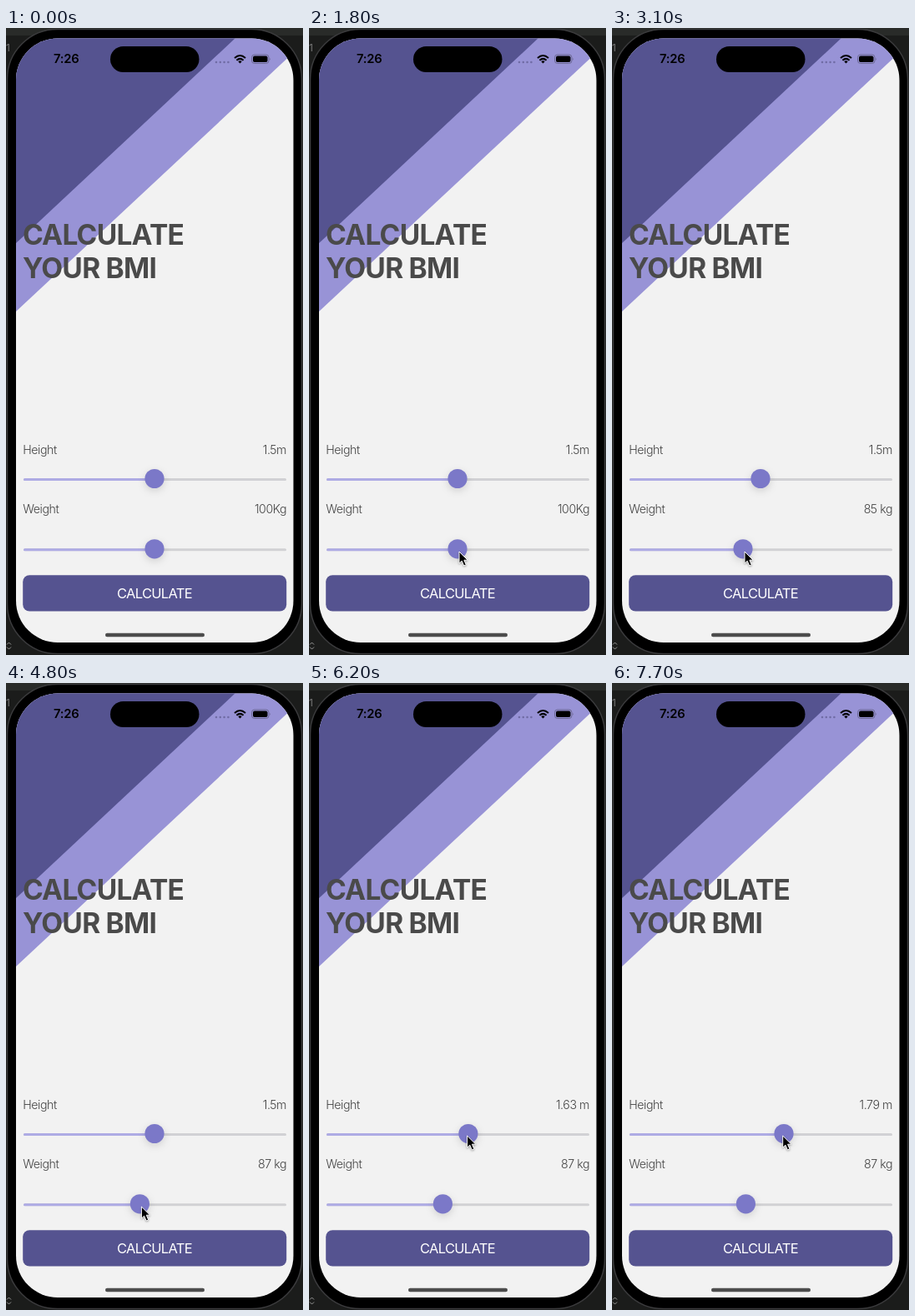
Write an HTML page that moves like this. It is 356x752 px and loops after 8 s.

```html
<!DOCTYPE html>
<html lang="en">
<head>
<meta charset="utf-8">
<title>BMI calculator</title>
<style>
  html, body { margin: 0; width: 100%; height: 100%; overflow: hidden; background: #1b1c1b; }
  svg { display: block; width: 100vw; height: 100vh; font-family: Inter, "Open Sans", sans-serif; }
  .title { font-size: 33.5px; font-weight: 700; letter-spacing: -.75px; fill: #4a4a4a; }
  .label { font-size: 14.2px; font-weight: 300; letter-spacing: -.45px; fill: #444; }
  .value { text-anchor: end; }
  .button { font-size: 16.5px; letter-spacing: -.7px; text-anchor: middle; fill: #fff; }
  .clock { font-size: 14.8px; font-weight: 600; letter-spacing: -.3px; text-anchor: middle; }
  .track { stroke: #d1d1d4; stroke-width: 3; stroke-linecap: round; }
  .fill { stroke: #aeabe4; }
  .knob { fill: #7b78c8; filter: drop-shadow(0 3px 5px #0002); }
</style>
</head>
<body>
<svg viewBox="0 0 356 752" preserveAspectRatio="none">
  <defs>
    <clipPath id="screen"><rect x="12" y="12.5" width="332.5" height="724.5" rx="50"/></clipPath>
  </defs>

  <!-- desktop and phone body -->
  <path d="M0 0H356V9H0Z" fill="#292b29"/>
  <text x="0" y="28" font-size="12" fill="#777">1</text>
  <rect x="1.5" y="1.5" width="353" height="749" rx="60" stroke="#3b3b3d" stroke-width="1.5"/>
  <path d="M1 739.5l2.5-2.5 2.5 2.5M1 742.5l2.5 2.5 2.5-2.5" fill="none" stroke="#999"/>

  <g clip-path="url(#screen)">
    <path d="M11 12H345V738H11Z" fill="#f2f2f2"/>
    <path d="M11 12H345V29L11 341Z" fill="#9893d6"/>
    <path d="M11 12H275L11 259Z" fill="#555390"/>
  </g>

  <!-- status bar -->
  <text class="clock" x="72.2" y="42.3">7:26</text>
  <rect x="125" y="22" width="106.5" height="31" rx="15.5"/>
  <path d="M252 41h15" stroke="#706ca5" stroke-width="2.6" stroke-linecap="round" stroke-dasharray="0 4.8"/>
  <g fill="none" stroke="#000" stroke-width="2">
    <path d="M274 36Q280.5 30 287 36M276.4 38.8Q280.5 35 284.6 38.8"/>
    <path d="M278.3 40.2Q280.5 38.4 282.7 40.2L280.5 42.6Z" fill="#000" stroke="none"/>
  </g>
  <rect x="294.5" y="32" width="20.5" height="10.5" rx="3.3" fill="none" stroke="#6c6994"/>
  <rect x="296" y="33.5" width="17.5" height="7.5" rx="2"/>
  <path d="M316.3 35.7q1.6 1.5 0 3.2z" fill="#6c6994"/>

  <text class="title" x="20" y="260">CALCULATE</text>
  <text class="title" x="20" y="300">YOUR BMI</text>

  <text class="label" x="20.3" y="510.5">Height</text>
  <text class="label value" id="heightText" x="336" y="510.5"></text>
  <path class="track" d="M22.5 541.5H334.5"/>
  <path class="track fill" id="heightFill"/>
  <circle class="knob" id="heightKnob" cy="540.5" r="11.6"/>

  <text class="label" x="20.3" y="581.5">Weight</text>
  <text class="label value" id="weightText" x="336" y="581.5"></text>
  <path class="track" d="M22.5 625.8H334.5"/>
  <path class="track fill" id="weightFill"/>
  <circle class="knob" id="weightKnob" cy="624.8" r="11.6"/>

  <rect x="20.2" y="656.2" width="316" height="43.3" rx="8" fill="#555390"/>
  <text class="button" x="178" y="684">CALCULATE</text>
  <rect x="119" y="725.8" width="119" height="4.4" rx="2.2" fill="#4c4c4c"/>

  <path id="cursor" d="M0 0V14.2L3.2 11.2 5.7 17 8.3 15.9 5.9 10.2H10.2Z" stroke="#fff"
    style="filter: drop-shadow(0 1px 1px #0005)"/>
</svg>
<script>
const DURATION = 8000, STEP = 100, MIDDLE = 178;
const $ = id => document.getElementById(id);

// Eased progress from 0 to 1 between two times
function ease(time, from, to) {
  const k = Math.min(1, Math.max(0, (time - from) / (to - from)));
  return 1 - (1 - k) ** 1.9;
}

function setSlider(name, x, y, text) {
  $(name + "Knob").setAttribute("cx", x);
  $(name + "Fill").setAttribute("d", `M22.5 ${y}H${x}`);
  $(name + "Text").textContent = text;
}

function draw(elapsed) {
  const time = Math.floor(elapsed % DURATION / STEP) * STEP;

  const weightX = MIDDLE - 21 * ease(time, 1850, 3100) + 3.4 * ease(time, 4200, 4400);
  const heightX = MIDDLE + 24 * ease(time, 5900, 6800) + 4 * ease(time, 6800, 7700);
  const ratio = x => (x - 32) / 292;
  setSlider("weight", weightX, 625.8, weightX === MIDDLE ? "100Kg" : Math.floor(ratio(weightX) * 200) + " kg");
  setSlider("height", heightX, 541.5, heightX === MIDDLE ? "1.5m" : (ratio(heightX) * 3).toFixed(2) + " m");

  // The cursor comes up to the weight knob, follows it, then moves to the height knob
  const approach = 1 - ease(time, 700, 1200), travel = ease(time, 5000, 5600);
  const x = weightX + 2 + 10 * approach + (heightX - weightX - 3.3) * travel;
  const y = 628 + 32 * approach - 85 * travel;
  $("cursor").setAttribute("transform", `translate(${x} ${y})`);
  $("cursor").setAttribute("visibility", time < 700 ? "hidden" : "visible");
}

const start = performance.now();
function tick() {
  draw(performance.now() - start);
  requestAnimationFrame(tick);
}
tick();
</script>
</body>
</html>
```
